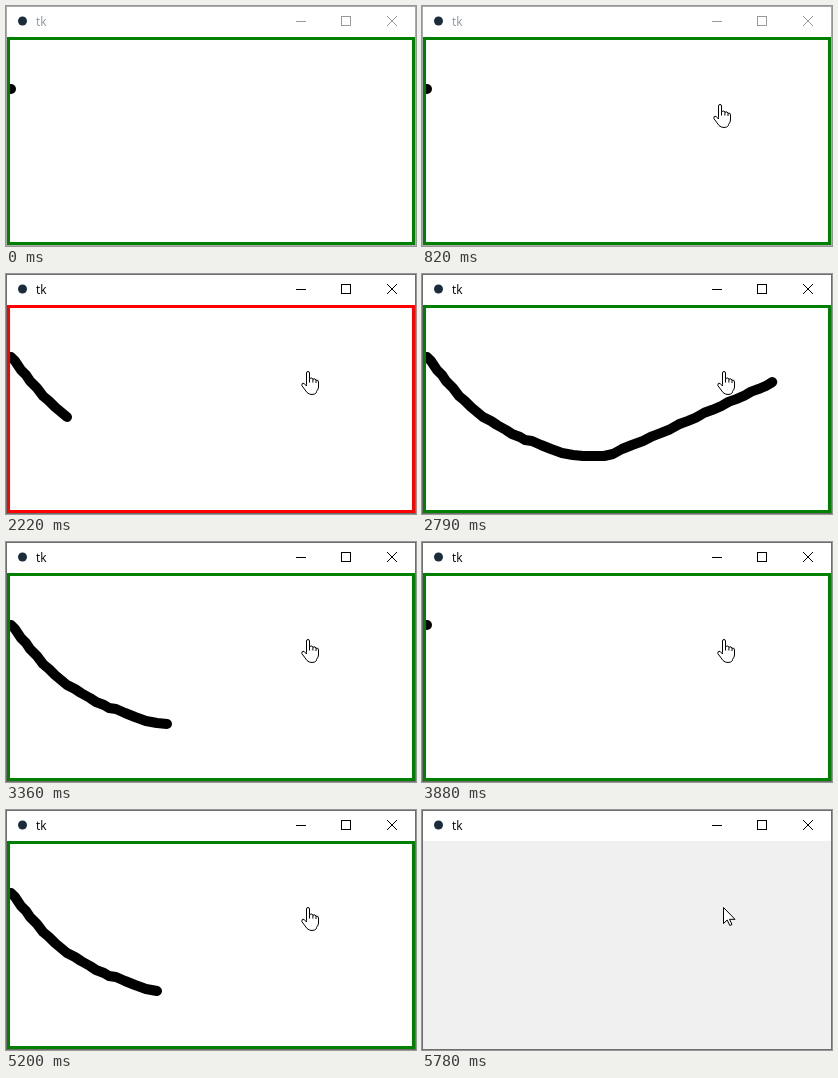
An HTML page with a canvas for the animation above (6.47 s loop, 410 by 240 pixels).

```html
<!DOCTYPE html>
<html lang="en">
<head>
<meta charset="utf-8">
<title>tk</title>
<style>
html, body { margin: 0; width: 100%; height: 100%; overflow: hidden; background: #fff; }
canvas { display: block; }
</style>
</head>
<body>
<canvas id="stage" width="410" height="240"></canvas>
<script>
const ctx = document.getElementById('stage').getContext('2d');
const LOOP = 6470, ENTER = 680, ARRIVE = 840, FOCUS = 1120, CLOSE = 5780;
const RUNS = [1110, 2040, 2970, 3860, 4840];   // start of each replay
const TICK = 30, POINT_MS = 17, LAST = 55;

// Stroke: hand-drawn dip, then a slowing climb to the right edge
const stroke = [
  [5, 83], [9, 87], [15, 96], [20, 101], [24, 107], [31, 114], [37, 122],
  [43, 127], [49, 133], [55, 138], [61, 143], [69, 147], [75, 151], [84, 156],
  [90, 160], [98, 163], [103, 166], [110, 167], [119, 171], [129, 175],
  [140, 179], [151, 181], [161, 182], [171, 182], [182, 182], [191, 180],
  [200, 175], [210, 171], [221, 167]
];
for (let i = stroke.length, n = i - 1; i <= LAST; i++) {
  const u = (i - n) / (LAST - n);
  const k = 1 - Math.pow(1 - u, 1.35);
  stroke.push([221 + 184 * k, 167 - 83 * k + Math.sin(i * 2.1) * 0.6]);
}

function box(x, y, w, h, color) {
  ctx.fillStyle = color;
  ctx.fillRect(x, y, w, h);
}

function drawWindow(active) {
  const ink = active ? '#000' : '#999';
  box(0, 0, 410, 240, active ? '#6e6e6e' : '#aaa');
  box(1, 1, 408, 238, '#fff');
  ctx.fillStyle = '#1d2c3c';
  ctx.beginPath();
  ctx.arc(16.5, 15, 4.5, 0, 7);
  ctx.fill();
  ctx.fillStyle = active ? '#000' : '#8c96a2';
  ctx.font = '12px "Open Sans", "Noto Sans", sans-serif';
  ctx.fillText('tk', 30, 20);
  box(290, 15, 10, 1, ink);
  ctx.strokeStyle = ink;
  ctx.lineWidth = 1;
  ctx.strokeRect(335.5, 10.5, 9, 9);
  ctx.beginPath();
  ctx.moveTo(381, 10);
  ctx.lineTo(391, 20);
  ctx.moveTo(391, 10);
  ctx.lineTo(381, 20);
  ctx.stroke();
}

function drawCanvas(count, border) {
  box(1, 31, 408, 208, border);
  box(4, 34, 402, 202, '#fff');
  ctx.save();
  ctx.beginPath();
  ctx.rect(4, 34, 402, 202);
  ctx.clip();
  ctx.strokeStyle = '#000';
  ctx.lineWidth = 10;
  ctx.lineCap = ctx.lineJoin = 'round';
  ctx.beginPath();
  ctx.moveTo(...stroke[0]);
  ctx.lineTo(...stroke[0]);
  for (let i = 1; i <= count; i++) ctx.lineTo(...stroke[i]);
  ctx.stroke();
  ctx.restore();
}

const hand = new Path2D(
  'M300.5 110.5V99Q300.5 97.5 302 97.5T303.5 99V104.5Q306.5 103 306.9 105.2' +
  'Q309.5 104 310 106.2Q312.5 105.5 312.5 108V113Q312.5 115 310.5 117.5V118.5' +
  'Q309 120.5 306 120.5T301 118.5L295.8 111.5Q295.5 108.8 298 109.3L300.5 112Z' +
  'M303.5 104.5V108.5M306.9 105.2V108.5M310 106.2V109');
const arrow = new Path2D(
  'M301.5 97.5V113.5L305.2 110L307.8 115.5L310 114.5L307.5 109.3H313Z');

function drawCursor(shape, dx, dy) {
  ctx.save();
  ctx.translate(dx, dy);
  ctx.fillStyle = '#fff';
  ctx.fill(shape);
  ctx.strokeStyle = '#000';
  ctx.lineWidth = 1;
  ctx.lineJoin = 'round';
  ctx.stroke(shape);
  ctx.restore();
}

function draw(t) {
  drawWindow(t >= FOCUS);
  if (t >= CLOSE) {
    box(1, 31, 408, 208, '#f0f0f0');
    drawCursor(arrow, 0, 0);
    return;
  }
  const start = RUNS.filter(s => s <= t).pop();
  const phase = start === undefined ? 0 : Math.floor((t - start) / TICK) * TICK;
  const count = Math.min(LAST, Math.floor(phase / POINT_MS));
  drawCanvas(count, phase >= 30 && phase < 270 ? '#f00' : '#008000');
  if (t >= ENTER) {
    const step = Math.floor((t - ENTER) / 20) * 20;
    const left = Math.pow(1 - Math.min(1, step / (ARRIVE - ENTER)), 2);
    drawCursor(hand, Math.round(-242 * left), Math.round(47 * left));
  }
}

const t0 = performance.now();
function frame() {
  draw((performance.now() - t0) % LOOP);
  requestAnimationFrame(frame);
}
frame();
</script>
</body>
</html>
```
